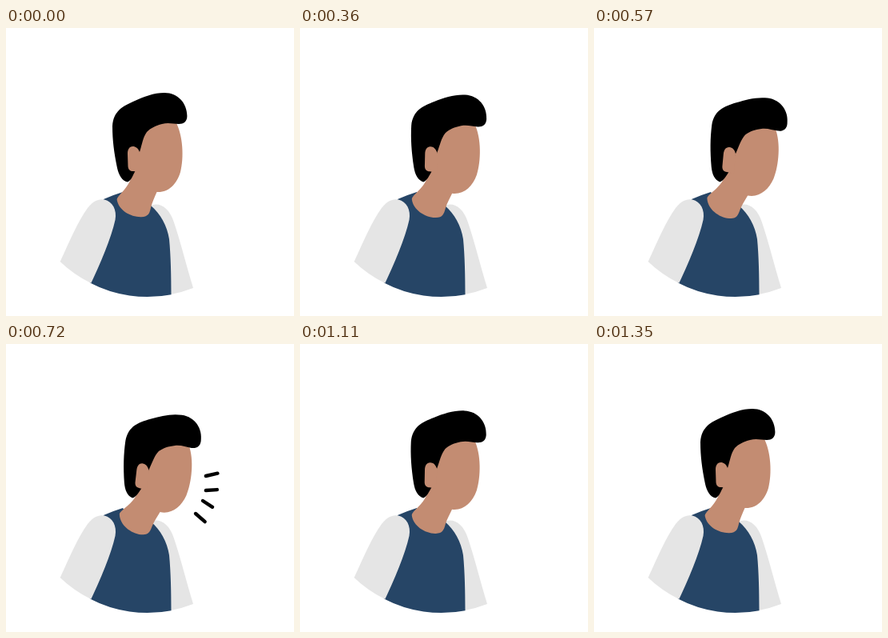
An HTML page with a canvas for the animation above (1410 ms loop, 360 px wide and 360 px high).

```html
<!DOCTYPE html>
<html lang="en">
<head>
<meta charset="utf-8">
<title>Talking figure</title>
<style>
  html, body { margin: 0; width: 100%; height: 100%; overflow: hidden; background: #fff; }
  canvas { display: block; width: 360px; height: 360px; }
</style>
</head>
<body>
<canvas id="stage" width="360" height="360"></canvas>
<script>
const ctx = document.getElementById('stage').getContext('2d');
const LOOP = 1410, STEP = 30;
const SKIN = '#c38c72', SHIRT = '#264566', SLEEVE = '#e5e5e5', INK = '#000';
const PIVOT = [155, 236], TILT = 8.2 * Math.PI / 180;

const rightSleeve = new Path2D('M180 222C192 217 204 224 210 243C219 270 226 299 234 325A155 155 0 0 1 206 333L196 250Z');
const shirt = new Path2D('M122 214Q133 209 146 205L160 225L181 222C193 232 201.5 247 204 264C206 285 206.5 310 206.5 333.2A155 155 0 0 1 105 318.5L120 260Z');
const leftSleeve = new Path2D('M67.6 292C80 266 89 243 102 225C109 216 116 213 123 214.5C133 217 139 227 136.5 240C131.5 263 117.2 296 106.3 319A155 155 0 0 1 67.6 292Z');
const face = new Path2D('M164 150L176 118L212 117C221.5 134 222.5 163 218 180C213.5 195 203 206 188.5 205C186 211 183 217 181.2 224C179.6 231 178.5 236 169 236.2C156 236.5 141 228 138.7 215C138.5 210 149 204 155 191L160 178Z');
const hair = new Path2D('M152 192.5C145 191 141 184 139 175C135 156 133 140 133 123C134 104 145.5 98 160 91.5C172 86 185 81 198 81C215 81 226.4 94 226.4 110C226.4 117 222 120 216 120C209 120 203 118 195 120C187 122 181 125 176 130C171 137 170 146 167 155L162 178C158 185 157 190 152 192.5Z');
const ear = new Path2D('M167 155C165 150 162 148 158.5 148C154 148 152 152 152 157L152.5 173C153 177 155 179 159 179L168 180Z');

// Each ray: inner x, y, outer x, y
const rays = [
  [249.8, 165, 278.2, 158.5],
  [249.8, 183, 277, 181.2],
  [246, 196, 269.3, 211.2],
  [237, 212, 259.6, 231.6]
];

function ease(t, from, to) {
  const s = Math.min(1, Math.max(0, (t - from) / (to - from)));
  return s * s * (3 - 2 * s);
}

function fill(path, color) {
  ctx.fillStyle = color;
  ctx.fill(path);
}

function drawBody() {
  fill(rightSleeve, SLEEVE);
  fill(shirt, SHIRT);
  fill(leftSleeve, SLEEVE);
}

function drawHead(lean) {
  ctx.save();
  ctx.translate(...PIVOT);
  ctx.rotate(TILT * lean);
  ctx.translate(-PIVOT[0], -PIVOT[1]);
  fill(face, SKIN);
  fill(hair, INK);
  fill(ear, SKIN);
  ctx.restore();
}

function drawRays(tail, tip) {
  if (tip <= tail) return;
  ctx.strokeStyle = INK;
  ctx.lineWidth = 4.4;
  ctx.lineCap = 'round';
  for (const [x0, y0, x1, y1] of rays) {
    const at = k => [x0 + (x1 - x0) * k, y0 + (y1 - y0) * k];
    ctx.beginPath();
    ctx.moveTo(...at(tail));
    ctx.lineTo(...at(tip));
    ctx.stroke();
  }
}

function draw(now) {
  const t = Math.min(1350, Math.floor((now % LOOP) / STEP) * STEP);
  ctx.fillStyle = '#fff';
  ctx.fillRect(0, 0, 360, 360);
  drawBody();
  drawHead(ease(t, 115, 700) - ease(t, 865, 1275));
  drawRays(ease(t, 720, 990), ease(t, 600, 835));
}

const start = performance.now();
function frame() {
  draw(performance.now() - start);
  requestAnimationFrame(frame);
}
frame();
</script>
</body>
</html>
```
